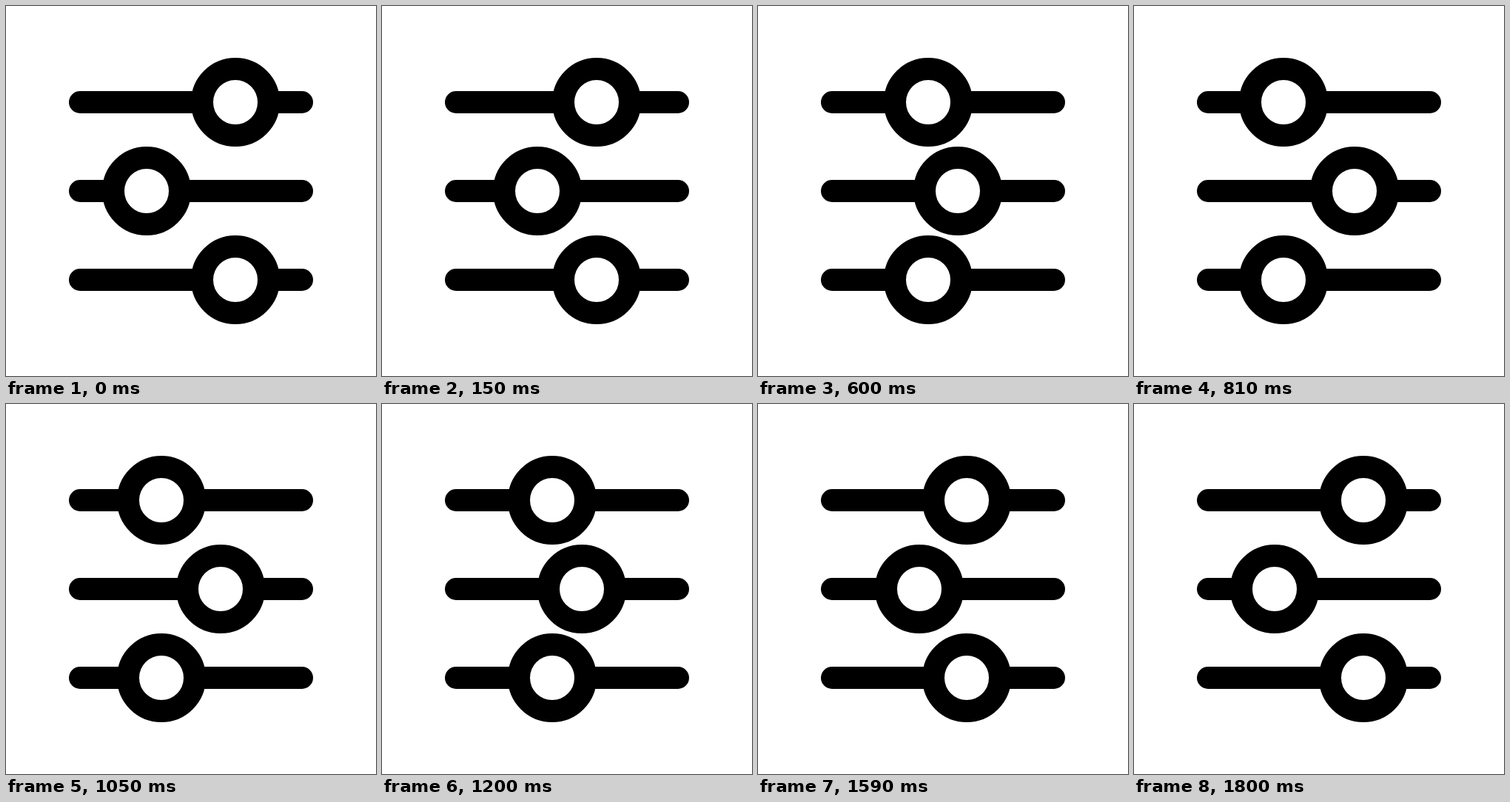
Recreate the animation shown at these times as an HTML page. Size 500 by 500 pixels, loop 2160 ms.

```html
<!DOCTYPE html>
<html lang="en">
<head>
<meta charset="utf-8">
<title>Sliders</title>
<style>
  html, body { margin: 0; width: 100%; height: 100%; overflow: hidden; background: #fff; }
  svg { display: block; width: 100%; height: 100%; }
  line, circle { stroke: #000; stroke-width: 30; }
  line { stroke-linecap: round; }
  circle { fill: #fff; }
</style>
</head>
<body>
<svg viewBox="0 0 500 500">
  <line x1="100" y1="130" x2="400" y2="130"/>
  <line x1="100" y1="250" x2="400" y2="250"/>
  <line x1="100" y1="370" x2="400" y2="370"/>
  <circle cx="310" cy="130" r="45" data-travel="-120"/>
  <circle cx="190" cy="250" r="45" data-travel="120"/>
  <circle cx="310" cy="370" r="45" data-travel="-120"/>
</svg>
<script>
  const LOOP = 2160, TURN = 900, REST = 1800;
  const easing = 'steps(30, end)'; // one 4px move every 30 ms

  for (const knob of document.querySelectorAll('circle')) {
    const home = 'translateX(0px)';
    const away = `translateX(${knob.dataset.travel}px)`;
    knob.animate([
      { offset: 0, transform: home, easing },
      { offset: TURN / LOOP, transform: away, easing },
      { offset: REST / LOOP, transform: home },
      { offset: 1, transform: home }
    ], { duration: LOOP, iterations: Infinity });
  }
</script>
</body>
</html>
```
